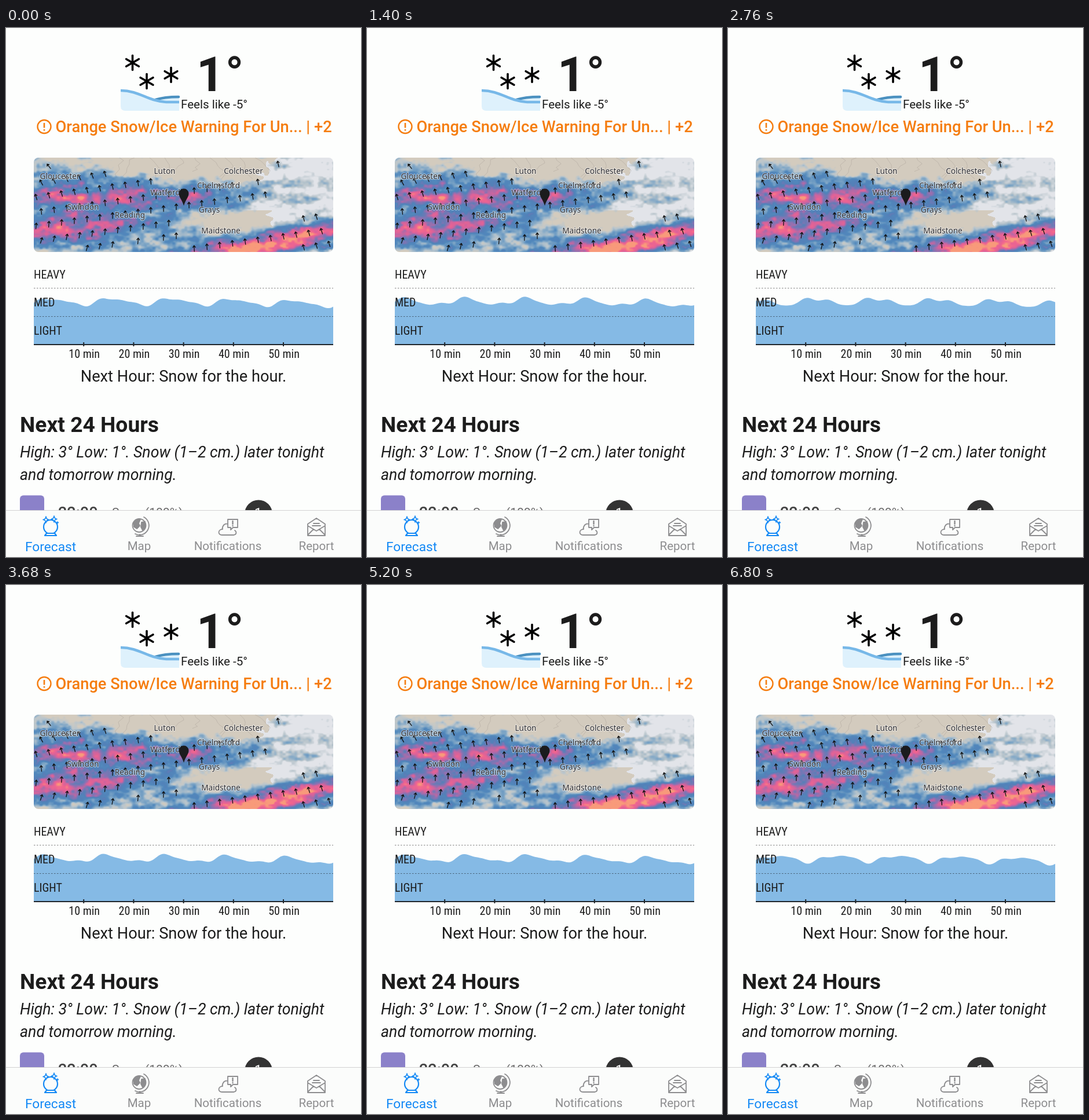
These frames come from a looping animation (613 px wide and 914 px high, 6.84 s). An HTML page with a canvas:

```html
<!DOCTYPE html>
<html lang="en">
<head>
<meta charset="utf-8">
<title>Forecast</title>
<style>
html, body { margin: 0; width: 100%; height: 100%; overflow: hidden; background: #fdfefd; }
canvas { position: absolute; left: 48px; top: 224px; border-radius: 8px; }
svg { position: absolute; left: 0; top: 0; }
text { font-family: Roboto, sans-serif; fill: #1c1c1c; white-space: pre; }
.mid { text-anchor: middle; }
.warn { font-size: 27.25px; font-weight: 500; fill: #f57d10; }
.narrow { font-family: "Roboto Condensed", Roboto, sans-serif; font-size: 20px; }
.town { font-family: "Noto Sans", sans-serif; font-size: 13.6px; fill: #2f2f33; text-anchor: middle;
  paint-order: stroke; stroke: rgba(255,255,255,.55); stroke-width: 2px; stroke-linejoin: round; }
.summary { font-size: 26.7px; font-style: italic; }
.tab { font-size: 20.5px; fill: #8d8d8f; text-anchor: middle; }
.line { fill: none; stroke-linecap: round; stroke-linejoin: round; }
</style>
</head>
<body>
<canvas id="map" width="517" height="163"></canvas>
<svg width="613" height="914" viewBox="0 0 613 914">
  <!-- current conditions -->
  <path d="M198 108C222 108 240 121 258 125C270 119 284 118 299 119V143H206Q198 143 198 135Z" fill="#def1fc"/>
  <path class="line" d="M258 124C270 120 284 119 298 119" stroke="#4b91c0" stroke-width="4.5"/>
  <path class="line" style="stroke-linecap:butt" d="M198 108C222 108 238 119 255 124S283 128 299 128" stroke="#77b8e8" stroke-width="4.5"/>
  <g id="flakes" class="line" stroke="#000" stroke-width="3.6"></g>
  <text x="329" y="109" font-size="83" font-weight="700">1<tspan dx="2" font-weight="500">°</tspan></text>
  <text x="302" y="139" font-size="20.6">Feels like -5°</text>

  <circle cx="66" cy="170.5" r="11.5" fill="none" stroke="#f57d10" stroke-width="2.4"/>
  <path d="M66 164V172.500M66 175V177.500" stroke="#f57d10" stroke-width="2.6"/>
  <text class="warn" x="85.5" y="180">Orange Snow/Ice Warning For Un... | +2</text>

  <!-- map overlay -->
  <path id="arrows" class="line" stroke="#111" stroke-width="1.3"/>
  <g id="towns"></g>
  <path d="M307 307C304 297 298.500 292 298.500 286A8.500 8.500 0 0 1 315.500 286C315.500 292 310 297 307 307Z" fill="#1b1b1d"/>

  <!-- next hour -->
  <path id="wave" fill="#85bae5"/>
  <path d="M48 449.500H565M48 498.500H565" stroke="#111" stroke-opacity=".5" stroke-dasharray="2.5"/>
  <g id="chart" stroke-width="2"></g>
  <text class="mid" x="306.5" y="611" font-size="27.2">Next Hour: Snow for the hour.</text>

  <!-- next day -->
  <text x="24" y="698" font-size="37.2" font-weight="700">Next 24 Hours</text>
  <text class="summary" x="24" y="742">High: 3° Low: 1°. Snow (1–2 cm.) later tonight</text>
  <text class="summary" x="24" y="781">and tomorrow morning.</text>
  <rect x="24" y="807.5" width="42" height="60" rx="6" fill="#8b81c9"/>
  <text x="90" y="847" font-size="27" font-weight="500" style="fill:#444">22:00</text>
  <text x="183" y="844" font-size="21" style="fill:#666">Snow (100%)</text>
  <circle cx="436" cy="839.5" r="24" fill="#333"/>
  <text class="mid" x="435.5" y="846" font-size="23" style="fill:#fff">1</text>

  <!-- tabs -->
  <rect y="833" width="613" height="81" fill="#fbfcfb"/>
  <path d="M0 833.500H613" stroke="#d2d2d2"/>
  <g class="line" stroke="#1489f5" stroke-width="2.2">
    <circle cx="77" cy="862" r="12"/>
    <path d="M70 873H84L87 877H67Z" fill="#fbfcfb"/>
    <path id="spark" d="M69 844Q69.500 849 74 849.500Q69.500 850 69 855Q68.500 850 64 849.500Q68.500 849 69 844Z" fill="#fbfcfb" stroke-width="1.6"/>
    <use href="#spark" x="14" y="-1"/>
    <path d="M89 853V856M87.500 854.500H90.500" stroke-width="1.6"/>
  </g>
  <text x="33" y="904" font-size="22.7" style="fill:#1489f5">Forecast</text>
  <g class="line" stroke="#8d8d8f" stroke-width="1.8">
    <circle cx="230" cy="859.5" r="11.5"/>
    <path d="M220 855L226 850L232 849L229 856L231 860L226 865L221 862ZM234 854L240 853L241 862L236 868L233 862Z" fill="#8d8d8f"/>
    <path d="M238 845A16 16 0 0 1 223 874M231 875V878M225 878H237"/>
    <path d="M383 857C375 855 373 864 374 866C366 866 365 876 373 876H393C399 875 398 870 395 868"/>
    <path d="M383 849H400V863H392L388 867V863H383Z"/>
    <path d="M391.500 852V857M391.500 860V860.200" stroke-width="2.4"/>
    <path d="M521 857L536 847L551 857V877H521ZM521 860L536 869L551 860M521 876L531 866M551 876L541 866M531 856H541M529 860H543"/>
  </g>
  <text class="tab" x="230" y="902">Map</text>
  <text class="tab" x="383" y="902">Notifications</text>
  <text class="tab" x="536" y="902">Report</text>
</svg>
<script>
const LOOP = 6840, STEP = 40, WAVE_MS = 750;
const LEFT = 48, RIGHT = 565, TOP = 224, BOTTOM = 387;
const TAU = 2 * Math.PI, RAD = Math.PI / 180;
const $ = id => document.getElementById(id);

function add(parent, tag, attrs, text) {
  const el = document.createElementNS("http://www.w3.org/2000/svg", tag);
  for (const key in attrs) el.setAttribute(key, attrs[key]);
  if (text) el.textContent = text;
  parent.append(el);
}

const mix = (a, b, f) => a + (b - a) * f;
function hash(x, y) {
  const s = Math.sin(x * 127.1 + y * 311.7) * 43758.5453;
  return s - Math.floor(s);
}
// Smooth value noise in -0.5..0.5
function noise(x, y) {
  const ix = Math.floor(x), iy = Math.floor(y);
  const ease = f => f * f * (3 - 2 * f);
  const fx = ease(x - ix), fy = ease(y - iy);
  return mix(mix(hash(ix, iy), hash(ix + 1, iy), fx),
             mix(hash(ix, iy + 1), hash(ix + 1, iy + 1), fx), fy) - .5;
}

// Soft elliptical patch around a centre line
function patch(x, y, cx, cy, rx, ry, slope = 0) {
  const dx = x - cx, dy = y - cy - slope * dx;
  return Math.exp(-((dx / rx) ** 2) - (dy / ry) ** 2);
}
function rainAt(x, y) {
  const west = .42 * patch(x, y, 110, 310, 210, 85);
  const upperBelt = .34 * patch(x, y, 180, 292, 130, 17, .05);
  const lowerBelt = .38 * patch(x, y, 80, 350, 150, 22, -.05);
  const eastTongue = .4 * patch(x, y, 370, 286, 85, 20);
  const southEast = .84 * patch(x, y, 460, 370, 190, 24, -.17);
  const north = .4 * patch(x, y, 320, 230, 130, 26);
  const kent = .4 * patch(x, y, 395, 334, 60, 17);
  const grain = .34 * noise(x / 40, y / 14) + .3 * noise(x / 13, y / 7) + .14 * noise(x / 5, y / 4);
  return .1 + west + upperBelt + lowerBelt + eastTongue + southEast - north - kent + grain;
}
function isSea(x, y) {
  const coast = y < 315 ? 465 - (y - TOP) * .8 : 455;
  return x > coast + noise(x / 9, y / 7) * 26;
}

const rgb = hex => [1, 3, 5].map(i => parseInt(hex.slice(i, i + 2), 16));
const land = rgb("#d3cbbe"), sea = rgb("#e2e4e9");
const ramp = ["#b9c5cc", "#7fa6c6", "#5188bc", "#5380b8", "#8a72b2", "#d4639c", "#f0648f", "#f89a7a"].map(rgb);

function drawMap() {
  const g = $("map").getContext("2d"), { width, height } = $("map");
  const img = g.createImageData(width, height);
  for (let y = 0, p = 0; y < height; y++) {
    for (let x = 0; x < width; x++, p += 4) {
      const sx = x + LEFT, sy = y + TOP;
      const ground = isSea(sx, sy) ? sea : land;
      const colors = [ground, ground, ...ramp];
      const v = Math.min(Math.max(rainAt(sx, sy), 0), .999) * (colors.length - 1);
      const i = Math.floor(v);
      for (let k = 0; k < 3; k++) img.data[p + k] = mix(colors[i][k], colors[i + 1][k], v - i);
      img.data[p + 3] = 255;
    }
  }
  g.putImageData(img, 0, 0);
  // Faint county borders
  g.strokeStyle = "rgba(150,142,135,.4)";
  g.lineWidth = .8;
  for (let i = 0; i < 10; i++) {
    let x = 148 + i * 26, y = 0;
    g.beginPath();
    g.moveTo(x, y);
    for (let k = 1; k < 6; k++) g.lineTo(x += (hash(i, k) - .5) * 22, y += 3 + hash(k, i) * 6);
    g.stroke();
  }
}

// Wind turns clockwise southwards in the west, and leans west over the sea
function arrow(x, y) {
  const west = Math.max(0, (300 - x) / 250), east = Math.max(0, (x - 300) / 250);
  const a = (west * (-45 + (y - 235) * .48) - east * 18) * RAD;
  const at = (u, v) => (x + u * Math.cos(a) - v * Math.sin(a)).toFixed(1) + " " +
                       (y + u * Math.sin(a) + v * Math.cos(a)).toFixed(1);
  return `M${at(0, 5)}L${at(0, -5)}M${at(-2.3, -2)}L${at(0, -5)}L${at(2.3, -2)}`;
}
function drawArrows() {
  let d = "";
  for (let row = -4; row < 6; row++) {
    for (let col = 0; col < 24; col++) {
      const x = 52 + col * 22 + (row & 1) * 9, y = 342 + row * 25 - col * 3;
      if (y > TOP + 7 && y < BOTTOM - 5 && x < RIGHT - 5 && rainAt(x, y) > .26) d += arrow(x, y);
    }
  }
  $("arrows").setAttribute("d", d);
}

function drawFlake(x, y) {
  for (const deg of [30, 90, 150]) {
    const dx = 12.5 * Math.cos(deg * RAD), dy = 12.5 * Math.sin(deg * RAD);
    add($("flakes"), "path", { d: `M${x - dx} ${y - dy}L${x + dx} ${y + dy}` });
  }
}
const town = (name, x, y) => add($("towns"), "text", { class: "town", x, y }, name);

function drawChart() {
  const chart = $("chart"), stroke = "#20262c";
  add(chart, "path", { d: `M${LEFT} 547H${RIGHT}`, stroke });
  ["HEAVY", "MED", "LIGHT"].forEach((name, i) =>
    add(chart, "text", { class: "narrow", x: LEFT, y: 432.5 + i * 48.7 }, name));
  for (let i = 1; i < 6; i++) {
    const x = LEFT + i * 86.2;
    add(chart, "path", { d: `M${x} 543V550`, stroke });
    add(chart, "text", { class: "narrow mid", x: x + 1, y: 570 }, i + "0 min");
  }
}

// Three travelling waves over a gently falling base line
function surface(x, t) {
  const u = TAU * (x - 139) / 104.4, p = TAU * t / WAVE_MS;
  const base = 472.6 + 4.4 * ((x - 210) / 355) ** 2;
  const swell = x > 300 ? 1 - (x - 300) / 2600 : 1;
  return base + swell * (5.5 * Math.cos(u - p + TAU * .075) +
    2.3 * Math.cos(2 * u + p) + 1.2 * Math.cos(3 * u + p - TAU * .1));
}
function drawWave(t) {
  let d = `M${LEFT} 546`;
  for (let x = LEFT; x < RIGHT; x += 3) d += `L${x} ${surface(x, t).toFixed(2)}`;
  $("wave").setAttribute("d", d + `L${RIGHT} ${surface(RIGHT, t).toFixed(2)}V546Z`);
}

drawMap();
drawArrows();
drawFlake(218.5, 60);
drawFlake(243, 92);
drawFlake(285, 81);
town("Gloucester", 93, 261);
town("Luton", 274, 252);
town("Colchester", 410, 252);
town("Chelmsford", 367, 277);
town("Watford", 275, 289);
town("Swindon", 133, 314);
town("Reading", 214, 328);
town("Grays", 351, 319);
town("Maidstone", 371, 355);
drawChart();

const start = performance.now();
function tick() {
  const t = (performance.now() - start) % LOOP;
  drawWave(Math.floor(t / STEP) * STEP);
  requestAnimationFrame(tick);
}
tick();
</script>
</body>
</html>
```
